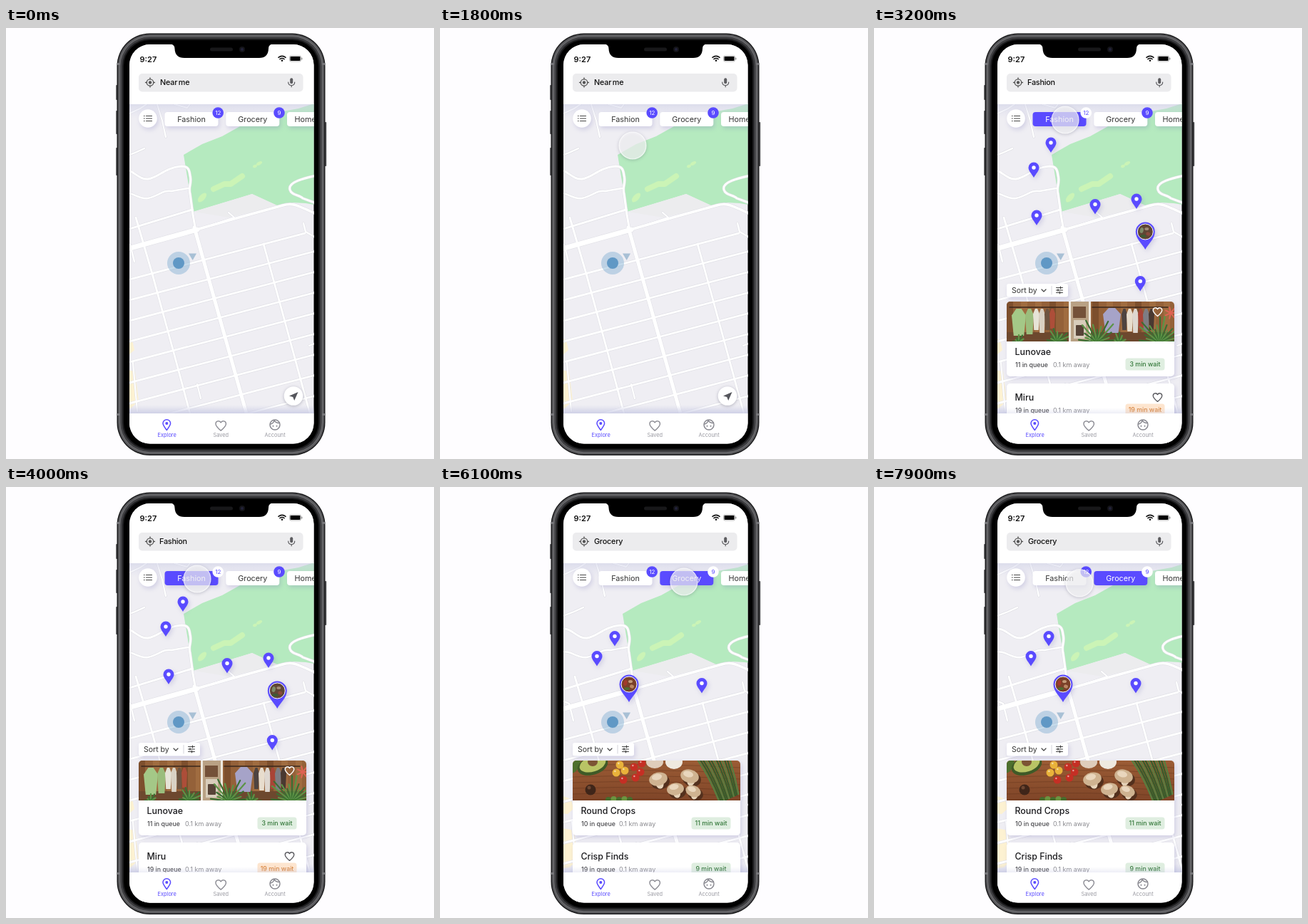
An HTML page that plays this animation: 600x605 px, repeating every 8 s.

```html
<!DOCTYPE html>
<html lang="en">
<head>
<meta charset="utf-8">
<title>Queue finder</title>
<style>
html, body { margin: 0; width: 100%; height: 100%; overflow: hidden; background: #fefdff; }
svg { display: block; width: 600px; height: 605px; font-family: Inter, Roboto, "Liberation Sans", sans-serif; }
.soft { filter: drop-shadow(2px 3px 3px rgba(90, 85, 170, .2)); }
.lift { filter: drop-shadow(0 1px 2px rgba(40, 40, 70, .3)); }
.line { fill: none; stroke-linecap: round; stroke-linejoin: round; }
</style>
</head>
<body>
<svg id="stage" viewBox="0 0 600 605"></svg>
<script>
const LOOP = 8000;
const PURPLE = '#5a4bff';

// ---------- drawing helpers ----------
const rect = (x, y, w, h, r, fill, extra = '') =>
  `<rect x="${x}" y="${y}" width="${w}" height="${h}" rx="${r}" fill="${fill}" ${extra}/>`;
const dot = (x, y, r, fill, extra = '') =>
  `<circle cx="${x}" cy="${y}" r="${r}" fill="${fill}" ${extra}/>`;
const oval = (x, y, rx, ry, turn, fill) =>
  `<ellipse rx="${rx}" ry="${ry}" fill="${fill}" transform="translate(${x} ${y}) rotate(${turn})"/>`;
const shape = (d, fill, extra = '') => `<path d="${d}" fill="${fill}" ${extra}/>`;
const line = (d, color, w) => `<path class="line" d="${d}" stroke="${color}" stroke-width="${w}"/>`;
const text = (s, x, y, size, color, weight = 400, anchor = 'start', extra = '') =>
  `<text x="${x}" y="${y}" font-size="${size}" fill="${color}" font-weight="${weight}" text-anchor="${anchor}" ${extra}>${s}</text>`;
const group = (body, attrs) => `<g ${attrs}>${body}</g>`;
const range = (n, fn) => Array.from({ length: n }, (_, i) => fn(i)).join('');

const heart = (x, y, scale, color, w) => group(
  line('M0 9C-7 3-9.5 0-9.5-3.5A5 5 0 0 1 0-5.8A5 5 0 0 1 9.5-3.5C9.5 0 7 3 0 9z', color, w / scale),
  `transform="translate(${x} ${y}) scale(${scale})"`);

// ---------- map ----------
function roads() {
  const list = [
    ['M160 199C178 196 184 213 199 212C214 210 222 196 246 194C256 194 257 200 258 207C261 219 255 222 258 233L262 262L266 285', 3],
    ['M160 232C178 228 184 241 199 239C214 236 220 227 232 229L255 225', 2.6],
    ['M160 183L181 175L194 169', 2.4],
    ['M160 126L188 113L197 107', 2.2],
    ['M211 104L219 130L224 153', 2.2],
    ['M260 104L254 112L236 107', 2],
    ['M160 286L261 255', 3],
    ['M182 266L205 345L235 455L259 545', 2.8],
    ['M160 298L174 304L180 328', 2.4],
    ['M361 303L385 390L427 545', 2.8],
    ['M417 274L420 286L432 293', 2.4],
    ['M267 283L330 265L388 249C406 244 412 252 440 263', 3.6],
    ['M312 259L320 266L290 276', 2],
    ['M440 206C417 211 395 216 398 227C400 235 411 234 416 239L440 248', 2.8],
    ['M268 500L273 520', 2.2],
    ['M178 470L184 538', 2],
    ['M425 446L440 440', 2],
    ['M264 280L339 548', 5],
    ['M160 313L268 283', 7]
  ];
  for (let k = 0; k < 9; k++) {
    const y = 353 + 29 * k;
    const end = k ? 440 : 419;
    list.unshift([`M160 ${y + 3.4}L${end} ${y - .264 * (end - 173)}`, 2.8]);
  }
  return list.map(([d, w]) => line(d, '#e0e0e6', w + 1.2)).join('') +
         list.map(([d, w]) => line(d, '#fff', w)).join('');
}

const map = () =>
  shape('M249 178L275 163L303 152L328 138L382 118L410 113L445 102V250L420 246L403 245L382 250L345 233L262 258z', '#b5eabf') +
  shape('M345 233L382 250L312 266L264 258z', '#ececee') +
  oval(275, 238, 8, 4, -48, '#cbf4b6') +
  line('M291 226L306 219L315 219L331 208', '#cbf4b6', 8) +
  oval(349, 194, 3, 2, -20, '#cbf4b6') + oval(355, 190, 4.5, 2.2, -30, '#cbf4b6') +
  shape('M160 432L177 438L180 452L172 459L160 458zM160 478L181 482L186 523L175 534L160 536z', '#fdf2d2') +
  roads();

const position = () =>
  dot(242, 330, 16, 'rgba(118,170,208,.42)') + dot(242, 330, 8, '#6098c5') +
  shape('M256 316.500H267L261.700 326z', '#a8c0d5');

// ---------- photos ----------
const plant = (x, y, r, n) => range(n, i => {
  const a = Math.PI * (1.04 + .92 * i / (n - 1));
  const len = r * (.75 + .25 * Math.sin(i * 5));
  return line(`M${x} ${y}L${x + Math.cos(a) * len} ${y + Math.sin(a) * len}`, i % 2 ? '#5c9446' : '#3b6f33', 2.2);
});

const shirt = (x, y, w, h, color) =>
  shape(`M${x + w * .32} ${y}H${x + w * .68}L${x + w} ${y + h * .25}L${x + w * .86} ${y + h}H${x + w * .14}L${x} ${y + h * .25}z`, color);

function clothesPhoto() {
  const left = [['#a4c887', 20, 38], ['#9bbd7c', 12, 36], ['#e6e3d6', 9, 30], ['#d9d2c4', 9, 34], ['#6d5541', 8, 30], ['#ad4e39', 8, 28]];
  const right = [['#4e4340', 8, 30], ['#e8ddcd', 9, 32], ['#ded7d0', 9, 34], ['#a94436', 8, 30], ['#7e7d83', 9, 32], ['#493931', 8, 30]];
  const rack = (list, x) => list.map(([color, w, h]) => {
    const s = shirt(x, 394, w, h, color);
    x += w - 1;
    return s;
  }).join('');
  return rect(186, 384, 235, 56, 0, '#946139') +
    range(12, i => rect(186 + i * 20, 384, 9, 56, 0, i % 3 ? '#a06c40' : '#7d4f2d')) +
    rect(186, 427, 235, 13, 0, '#6d482e') +
    line('M190 392H272M306 392H412', '#3b271d', 1.5) +
    rack(left, 193) + plant(257, 440, 19, 11) + plant(203, 441, 11, 7) +
    rect(273, 384, 31, 56, 0, '#b9a184') + rect(279, 391, 18, 16, 0, '#745139') +
    rect(280, 410, 17, 26, 0, '#d8cdbb') + rect(283, 417, 11, 15, 1, '#574337') +
    rect(273, 384, 3, 56, 0, '#eee9df') + rect(301, 384, 3, 56, 0, '#eee9df') +
    shirt(321, 393, 25, 35, '#a6a3c8') + rack(right, 347) +
    plant(313, 441, 35, 13) + plant(401, 442, 39, 17) + plant(344, 442, 15, 9) +
    range(7, i => line(`M416 400L${416 + 8 * Math.cos(i * .9)} ${400 + 8 * Math.sin(i * .9)}`, '#df6254', 2));
}

function foodPhoto() {
  const balls = (list, r, color) => list.map(([x, y]) =>
    dot(x, y, r, color) + dot(x - r * .3, y - r * .35, r * .22, 'rgba(255,255,255,.55)')).join('');
  const mushroom = (x, y, r, turn) => oval(x + 3, y + 4, r, r * .8, turn, '#53301d') +
    oval(x + 2, y + r * .5, r * .42, r * .55, turn, '#e6d3b9') +
    oval(x, y, r, r * .72, turn, '#cfb391') + oval(x - 2, y - 3, r * .55, r * .33, turn, '#e9d6bd');
  return rect(186, 384, 235, 56, 0, 'url(#wood)') +
    range(7, i => line(`M186 ${391 + i * 8}Q300 ${387 + i * 8} 421 ${394 + i * 8}`, 'rgba(70,34,17,.28)', 1)) +
    oval(188, 388, 8, 14, 18, '#4d6f2d') + oval(214, 391, 22, 13, -18, '#3f5a27') +
    oval(214, 389, 19, 10.5, -18, '#b9c465') + oval(214, 386, 7, 6, 0, '#7c5434') +
    dot(211, 425, 7.5, '#3f2519') + dot(209, 422, 2.5, '#6d4631') +
    range(5, i => dot(236 + i * 7.5, 439 - i % 2, 4, i % 2 ? '#6b9440' : '#466c2c')) +
    balls([[252, 390], [259, 398], [247, 401]], 5.5, '#e9b23a') +
    balls([[272, 393], [281, 400], [257, 411], [274, 408], [283, 388]], 5.5, '#c52f24') +
    oval(301, 386, 12, 9, 0, '#dfcdbb') + oval(328, 386, 12, 10, 0, '#efe9df') +
    mushroom(306, 410, 13, -12) + mushroom(350, 406, 13, 14) + mushroom(330, 424, 12, -8) + mushroom(355, 427, 11, 20) +
    range(13, i => line(`M${361 + i * 3.8} 383Q${378 + i * 3} 407 ${392 + i * 2.2} ${443 - i}`, i % 3 ? '#345f2c' : '#577f40', 2.2));
}

// ---------- interface ----------
const pin = (x, top) => group(
  shape('M0 21.500C-3 16-7.500 12-7.500 7.500A7.500 7.500 0 0 1 7.500 7.500C7.500 12 3 16 0 21.500z', PURPLE) + dot(0, 7.5, 2.7, '#fff'),
  `class="soft" transform="translate(${x} ${top})"`);

const photoPin = (x, y, tones) => group(
  shape('M0 25C-4 17-13.500 10-13.500 0A13.500 13.500 0 0 1 13.500 0C13.500 10 4 17 0 25z', PURPLE) +
  dot(0, 0, 11, tones[0], 'stroke="#fff" stroke-width="1"') +
  oval(-5, -2, 2.5, 4, 15, tones[1]) + oval(2, -4, 3, 2, 0, tones[2]) +
  oval(4, 3, 3, 2.5, 20, tones[3]) + oval(-3, 6, 4, 2, 0, tones[4]),
  `class="soft" transform="translate(${x} ${y})"`);

const chip = (name, x, count, on) =>
  group(rect(x, 118, 75, 20, 4, on ? PURPLE : '#fff'), 'class="soft"') +
  text(name, x + 37.5, 131.7, 10.8, on ? '#fff' : '#333', 400, 'middle') +
  (count ? dot(x + 74.7, 119, 7.8, on ? '#fff' : PURPLE) +
    text(count, x + 74.7, 122, 8, on ? PURPLE : '#fff', 400, 'middle') : '');

const chips = active =>
  chip('Fashion', 222.5, '12', active === 'Fashion') +
  chip('Grocery', 308.3, '9', active === 'Grocery') +
  group(rect(394, 118, 75, 20, 4, '#fff'), 'class="soft"') + text('Home', 404.5, 131.7, 10.8, '#333');

const query = (s, x) =>
  rect(212, 66, 150, 21, 0, '#ececee') +
  text(s, x, 80, 10.8, '#111', 500, 'start', 'letter-spacing="-.2" word-spacing="-1"');

function card(y, { name, queue, wait, busy }, photo) {
  const ty = photo ? y + 75 : y + 24;
  return group(rect(186, y, 235, 105, 5, '#fff'), 'class="soft"') +
    (photo ? group(photo, 'clip-path="url(#photo)"') : '') +
    text(name, 197.5, ty, 12.4, '#1d1d20', 500) +
    text(`${queue} in queue`, 198, ty + 17, 8.8, '#48484c', 500) +
    text('0.1 km away', 251, ty + 17, 9, '#88888d') +
    rect(352.5, ty + 4.5, 55, 17, 3.5, busy ? '#fde5cf' : '#dfeee0') +
    text(`${wait} min wait`, 380, ty + 16.3, 8.8, busy ? '#d9833a' : '#34783a', 500, 'middle');
}

const sortBox = () =>
  group(rect(186, 359, 86, 18.5, 3, '#fff'), 'class="soft"') +
  text('Sort by', 193, 371.8, 10.5, '#333') +
  line('M235 367L238 370L241 367', '#444', 1.2) + line('M249 362.500V374', '#d4d4da', 1) +
  line('M255.500 364.500H264.500M255.500 368H264.500M255.500 371.500H264.500', '#444', 1) +
  line('M261.500 363.200V365.800M258 366.700V369.300M260.500 370.200V372.800', '#444', 1.3);

const results = (stores, photo, hearts) =>
  sortBox() + card(384, stores[0], photo) + card(499, stores[1]) +
  (hearts ? heart(397.5, 398.5, .66, '#fff', 1.4) + heart(397.5, 518.5, .66, '#55555a', 1.3) : '');

const fashion = () =>
  [[248, 153.5], [224, 188.5], [228, 255.5], [310, 240], [368, 232.5], [373.3, 348]].map(p => pin(...p)).join('') +
  photoPin(380.3, 286, ['#5f4634', '#7d8c68', '#a08a76', '#8a4a3b', '#3e5a32']) +
  results([{ name: 'Lunovae', queue: 11, wait: 3 }, { name: 'Miru', queue: 19, wait: 19, busy: true }], clothesPhoto(), true) +
  chips('Fashion') + query('Fashion', 215);

const grocery = () =>
  [[245, 202], [220, 230], [367, 268]].map(p => pin(...p)).join('') +
  photoPin(265, 277, ['#7a4029', '#a23a2b', '#c29a78', '#b98663', '#4f6a31']) +
  results([{ name: 'Round Crops', queue: 10, wait: 11 }, { name: 'Crisp Finds', queue: 19, wait: 9 }], foodPhoto(), false) +
  chips('Grocery') + query('Grocery', 216);

const locateButton = () =>
  group(dot(403, 516.5, 13.3, '#fff'), 'class="lift"') +
  shape('M409.500 511L397 516.500L402.200 518L404.200 523z', '#55565c');

const header = () =>
  rect(173, 23, 259, 84, 0, '#fff') +
  text('9:27', 187.5, 48, 11, '#111', 600) +
  line('M382 41.300Q387 37.300 392 41.300', '#111', 1.7) + line('M384 43.700Q387 41.300 390 43.700', '#111', 1.6) +
  dot(387, 45.8, 1.3, '#111') +
  rect(397.5, 39, 16, 8, 2, 'none', 'stroke="#999" stroke-width=".7"') + rect(398.5, 40, 14, 6, 1, '#000') +
  rect(414.2, 41.5, 1.2, 3, .6, '#888') +
  rect(186, 64, 230.5, 25.5, 5, '#ececee') +
  dot(202, 76.5, 4.7, 'none', 'stroke="#555" stroke-width="1.3"') + dot(202, 76.5, 2.2, '#555') +
  line('M202 70V71.500M202 81.500V83M195.500 76.500H197M207 76.500H208.500', '#555', 1.3) +
  rect(398.2, 70.3, 4, 8, 2, '#5c5c60') +
  line('M395.700 76C395.700 82 404.700 82 404.700 76M400.200 80.500V82.700', '#5c5c60', 1.2);

const listButton = () =>
  group(dot(199, 127, 12.8, '#fff'), 'class="soft"') +
  line('M196.500 123.500H204.500M196.500 127H204.500M196.500 130.500H204.500', '#444', 1.2) +
  [123.5, 127, 130.5].map(y => dot(193.8, y, .8, '#444')).join('');

const nav = () =>
  rect(173, 541, 259, 43, 0, '#fff') +
  line('M225.300 564.500C222 560 220 557.500 220 555A5.300 5.300 0 0 1 230.600 555C230.600 557.500 228.600 560 225.300 564.500z', PURPLE, 1.5) +
  dot(225.3, 555, 2, PURPLE) +
  heart(301.2, 558.3, .76, '#8d8d95', 1.4) +
  dot(377, 557, 7, 'none', 'stroke="#85858d" stroke-width="1.4"') +
  line('M370.500 556Q375 555 376 551Q379 555 383.500 554.500', '#85858d', 1.3) +
  dot(374.5, 558.7, 1, '#85858d') + dot(379.5, 558.7, 1, '#85858d') +
  text('Explore', 225.7, 573.7, 7.4, PURPLE, 400, 'middle') +
  text('Saved', 301.3, 573.7, 7.4, '#9a9aa2', 400, 'middle') +
  text('Account', 377, 573.7, 7.4, '#9a9aa2', 400, 'middle');

// one ring of the phone body, drawn at a distance from its outer edge
const ring = (inset, fill) =>
  rect(155.5 + inset, 7.5 + inset, 292 - 2 * inset, 592.5 - 2 * inset, 46 - inset, fill);

const phone = () =>
  [[80, 21], [116, 33], [168, 39]].map(([y, h]) => rect(154.2, y, 2, h, .8, '#4a4a4d')).join('') +
  rect(447, 132, 2.2, 62, .8, '#4a4a4d') +
  ring(0, '#1b1b1d') + ring(1.5, '#59595c') + ring(3.5, '#6c6c6f') + ring(4.8, '#3e3e41') + ring(7.5, '#1c1c1e') +
  [57, 549].map(y => rect(155.5, y - 8, 4, 3, 0, '#77777b') + rect(443.5, y - 8, 4, 3, 0, '#77777b')).join('') +
  ring(9.5, '#000');

const notch = () =>
  shape('M230 22.500Q236.500 23 236.500 29Q237 42 250 42H355Q367.500 42 368 29Q368 23 374 22.500z', '#000') +
  rect(286, 27.5, 32, 5, 2.5, '#18181a') + dot(331, 30, 4, '#141418') + dot(331, 30, 2, '#22223a');

const clip = (id, body) => `<clipPath id="${id}">${body}</clipPath>`;
const fade = (id, from, to) =>
  `<linearGradient id="${id}" x1="0" y1="0" x2="0" y2="1"><stop stop-color="${from}"/><stop offset="1" stop-color="${to}"/></linearGradient>`;

document.getElementById('stage').innerHTML =
  `<defs>${clip('screen', rect(173, 23, 258.5, 560.5, 29, '#000'))}
  ${clip('photo', shape('M186 440V389A5 5 0 0 1 191 384H416A5 5 0 0 1 421 389V440z', '#000'))}
  ${fade('topShade', 'rgba(205,207,230,.55)', 'rgba(215,216,236,0)')}
  ${fade('navShade', 'rgba(205,207,230,0)', 'rgba(200,202,228,.7)')}
  ${fade('wood', '#9b5c35', '#7f4528')}</defs>` +
  phone() +
  group(
    rect(173, 23, 259, 561, 0, '#efeef3') +
    group(map(), 'id="map"') + rect(173, 107, 259, 20, 0, 'url(#topShade)') +
    rect(173, 529, 259, 12, 0, 'url(#navShade)') + position() + header() +
    group(chips('') + query('Near me', 216) + locateButton(), 'id="plain"') +
    group(fashion(), 'id="fashion"') + group(grocery(), 'id="grocery"') +
    listButton() + rect(173, 533, 259, 8, 0, 'url(#navShade)', 'opacity=".45"') + nav(), 'clip-path="url(#screen)"') +
  notch() +
  group(dot(0, 0, 19, 'rgba(255,255,255,.66)', 'stroke="rgba(255,255,255,.75)" stroke-width="1.2"'), 'id="touch" class="lift"');

// ---------- motion ----------
const byId = id => document.getElementById(id);
const [mapLayer, plain, fashionLayer, groceryLayer, touch] =
  ['map', 'plain', 'fashion', 'grocery', 'touch'].map(byId);

const clamp = v => Math.min(1, Math.max(0, v));
const smooth = v => v * v * (3 - 2 * v);
const ramp = (t, from, to) => smooth(clamp((t - from) / (to - from)));

// time, x, y
const path = [
  [1000, 497, 330], [1800, 270, 165], [2000, 268, 129], [4600, 268, 129],
  [5200, 342, 133], [7350, 342, 133], [7950, 287, 135]
];

function touchAt(t) {
  const next = path.findIndex(p => p[0] > t);
  if (next === 0) return path[0].slice(1);
  if (next < 0) return path[path.length - 1].slice(1);
  const a = path[next - 1], b = path[next];
  const k = ramp(t, a[0], b[0]);
  return [a[1] + (b[1] - a[1]) * k, a[2] + (b[2] - a[2]) * k];
}

function draw(t) {
  const f = ramp(t, 2550, 2950);
  const g = ramp(t, 5700, 6100);
  plain.style.opacity = f < 1 ? 1 : 0;
  // the outgoing cards fade beneath the incoming ones
  fashionLayer.style.opacity = f * (1 - g * g);
  groceryLayer.style.opacity = g;
  mapLayer.setAttribute('transform', `translate(${7 * g} 0)`);
  const [x, y] = touchAt(t);
  touch.setAttribute('transform', `translate(${x} ${y})`);
  touch.style.opacity = ramp(t, 950, 1100);
}

const start = performance.now();
function tick() {
  draw((performance.now() - start) % LOOP);
  requestAnimationFrame(tick);
}
tick();
</script>
</body>
</html>
```
